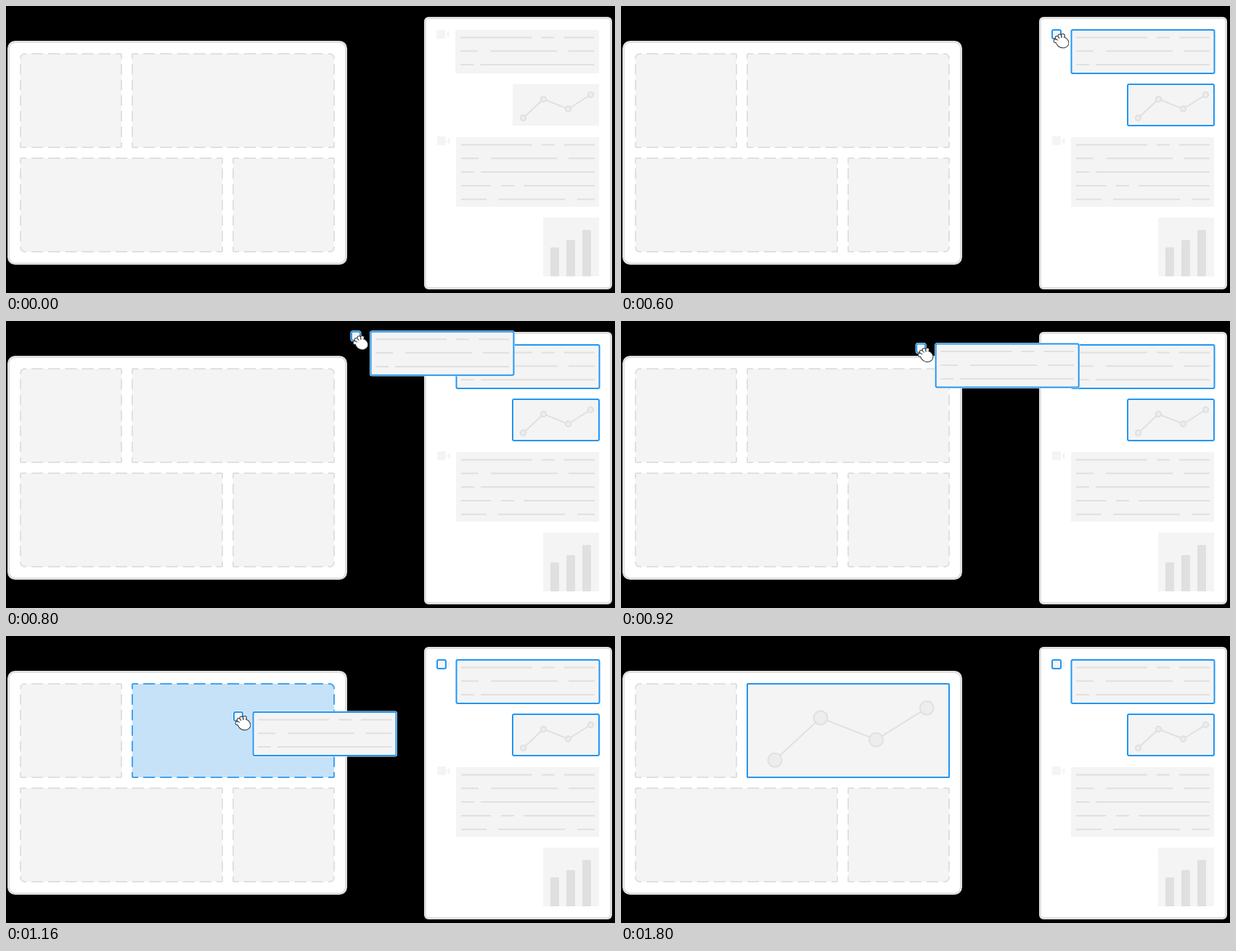
An HTML page with a canvas that plays this animation: 839x396 px, repeating every 2.24 s.

```html
<!DOCTYPE html>
<html lang="en">
<head>
<meta charset="utf-8">
<title>Drag to dashboard</title>
<style>
html, body { margin: 0; width: 100%; height: 100%; overflow: hidden; background: #000; }
canvas { display: block; }
</style>
</head>
<body>
<canvas id="stage" width="839" height="396"></canvas>
<script>
const ctx = document.getElementById('stage').getContext('2d');
const LOOP = 2240, STEP = 20;
const BLUE = '#2196f3', LINE = '#e0e0e0', FILL = '#f4f4f4';

// Each text row is one line, broken into words by a dash pattern.
const rowDashes = [
  [98, 13, 18, 13, 42],
  [24, 17, 92, 15, 36],
  [18, 9, 157],
  [41, 14, 18, 13, 98],
  [35, 16, 92, 17, 24]
];

const progress = (t, from, to) => Math.min(1, Math.max(0, (t - from) / (to - from)));

function withAlpha(alpha, draw) {
  if (alpha <= 0) return;
  ctx.save();
  ctx.globalAlpha = alpha;
  draw();
  ctx.restore();
}

function box(x, y, w, h, radius, fill, stroke, width = 2) {
  ctx.beginPath();
  ctx.roundRect(x, y, w, h, radius);
  if (fill) {
    ctx.fillStyle = fill;
    ctx.fill();
  }
  if (stroke) {
    ctx.strokeStyle = stroke;
    ctx.lineWidth = width;
    ctx.stroke();
  }
}

// Dashes are spaced per side so that a dash is centred on every corner.
function dashedBox(x, y, w, h, radii, fill, stroke) {
  box(x, y, w, h, radii, fill);
  ctx.save();
  ctx.strokeStyle = stroke;
  ctx.lineWidth = 2;
  ctx.translate(x + w / 2, y + h / 2);
  radii.forEach((r, i) => {
    const [length, depth] = i % 2 ? [h, w] : [w, h];
    const left = -length / 2, top = -depth / 2;
    const dash = length / Math.round(length / 22.5) - 7;
    ctx.setLineDash([dash, 7]);
    ctx.lineDashOffset = dash / 2 + r;
    ctx.beginPath();
    ctx.moveTo(left + r, top);
    ctx.lineTo(-left - radii[(i + 1) % 4], top);
    ctx.stroke();
    if (r) {
      ctx.setLineDash([]);
      ctx.beginPath();
      ctx.arc(left + r, top + r, r, Math.PI, Math.PI * 1.5);
      ctx.stroke();
    }
    ctx.rotate(Math.PI / 2);
  });
  ctx.restore();
}

function textLines(x, y, count) {
  ctx.save();
  ctx.strokeStyle = LINE;
  ctx.lineWidth = 2;
  rowDashes.slice(0, count).forEach((dashes, i) => {
    const rowY = y + i * 18.8;
    ctx.setLineDash([...dashes, 999]);
    ctx.beginPath();
    ctx.moveTo(x, rowY);
    ctx.lineTo(x + 184, rowY);
    ctx.stroke();
  });
  ctx.restore();
}

function lineChart(x, y, scale, radius) {
  const points = [[0, 32], [28, 6], [62, 19.5], [93, 0]]
    .map(([px, py]) => [x + px * scale, y + py * scale]);
  ctx.strokeStyle = LINE;
  ctx.fillStyle = '#ededed';
  ctx.lineWidth = 2;
  ctx.beginPath();
  points.forEach(p => ctx.lineTo(...p));
  ctx.stroke();
  for (const p of points) {
    ctx.beginPath();
    ctx.arc(...p, radius, 0, Math.PI * 2);
    ctx.fill();
    ctx.stroke();
  }
}

function grip(x, y) {
  box(x, y, 3.5, 7.5, [3, 0, 0, 3], FILL);
}

function handle(x, y) {
  box(x, y, 12, 12, 0, FILL);
  grip(x + 14, y + 2.5);
}

function checkbox() {
  box(594, 33, 12, 12, 2, FILL, BLUE);
}

function selectedText() {
  box(620.5, 33, 197, 60, 2, FILL, BLUE);
  textLines(627, 43.5, 3);
}

// A closed fist: a palm with four knuckles fanned around it.
function cursor() {
  const ray = (i, r) => {
    const angle = (192 + 29 * i) * Math.PI / 180;
    return [12.5 + r * Math.cos(angle), 13 + r * Math.sin(angle)];
  };
  ctx.save();
  ctx.translate(595, 37);
  for (const [color, grow] of [['#333', 0.5], ['#fff', -0.5]]) {
    ctx.fillStyle = color;
    ctx.beginPath();
    ctx.ellipse(13, 13, 9 + grow, 7.6 + grow, 0.4, 0, Math.PI * 2);
    ctx.fill();
    for (let i = 0; i < 4; i++) {
      ctx.beginPath();
      ctx.arc(...ray(i, 9), 2.5 + grow, 0, Math.PI * 2);
      ctx.fill();
    }
  }
  ctx.strokeStyle = '#333';
  ctx.lineWidth = 1;
  ctx.beginPath();
  for (let i = 0.5; i < 3; i++) {
    ctx.moveTo(...ray(i, 10));
    ctx.lineTo(...ray(i, 6));
  }
  ctx.stroke();
  ctx.restore();
}

function dashboard(t) {
  box(3.5, 49.5, 465, 306, 9, '#fff', LINE, 3);
  const shown = progress(t, 1420, 1800);
  for (let row = 0; row < 2; row++) {
    for (let col = 0; col < 2; col++) {
      const w = row === col ? 139 : 278;
      const x = col ? 452 - w : 20, y = 66 + 144 * row;
      const outer = row ? 3 - col : col;
      const radii = [0, 1, 2, 3].map(i => i === outer ? 6 : 0);
      const drop = col > row && t >= 1160;
      dashedBox(x, y, w, 129, radii, drop ? '#c6e2f8' : FILL, drop ? '#45a3ed' : LINE);
    }
  }
  withAlpha(shown, () => {
    box(174, 66, 278, 129, 1, FILL, BLUE);
    lineChart(212, 99.3, 2.25, 9.5);
  });
}

function report(t) {
  const selected = t >= 320;
  box(577.5, 16.5, 256, 373, 4.5, '#fff', LINE, 3);

  if (!selected) {
    handle(593, 33);
    box(619, 33, 198, 60, 0, FILL);
    textLines(626.3, 43.5, 3);
  } else {
    if (t < 600 || t >= 980) {
      grip(608, 35.5);
      checkbox();
    }
    selectedText();
  }

  box(698, 108, 119, 57, selected ? 2 : 0, FILL, selected && BLUE);
  lineChart(712.5, 122.5, 1, 3.7);

  handle(594, 180);
  box(620, 181, 197, 96, 0, FILL);
  textLines(627, 191.5, 5);

  box(740, 292, 77, 81, 0, FILL);
  [40, 50, 64].forEach((h, i) =>
    box(750 + 22 * i, 373 - h, 12, h, [1.5, 1.5, 0, 0], LINE));
}

function dragOffset(t) {
  const p = progress(t, 600, 1120), q = 1 - p;
  const curve = (a, b, end) => 3 * q * q * p * a + 3 * q * p * p * b + p * p * p * end;
  return [curve(-98, -217, -280), curve(-41, -16, 72)];
}

function dragged(t) {
  withAlpha(1 - progress(t, 1280, 1400), () => {
    ctx.translate(...dragOffset(t));
    box(594, 33, 12, 12, 2, null, '#fff', 3);
    box(620.5, 33, 197, 60, 2, null, '#fff', 3);
    checkbox();
    selectedText();
    cursor();
  });
}

function render(t) {
  ctx.fillStyle = '#000';
  ctx.fillRect(0, 0, 839, 396);
  dashboard(t);
  report(t);
  if (t >= 600) dragged(t);
  else if (t >= 160) cursor();
}

const start = performance.now();
function tick() {
  const t = (performance.now() - start) % LOOP;
  render(Math.floor(t / STEP) * STEP);
  requestAnimationFrame(tick);
}
tick();
</script>
</body>
</html>
```
